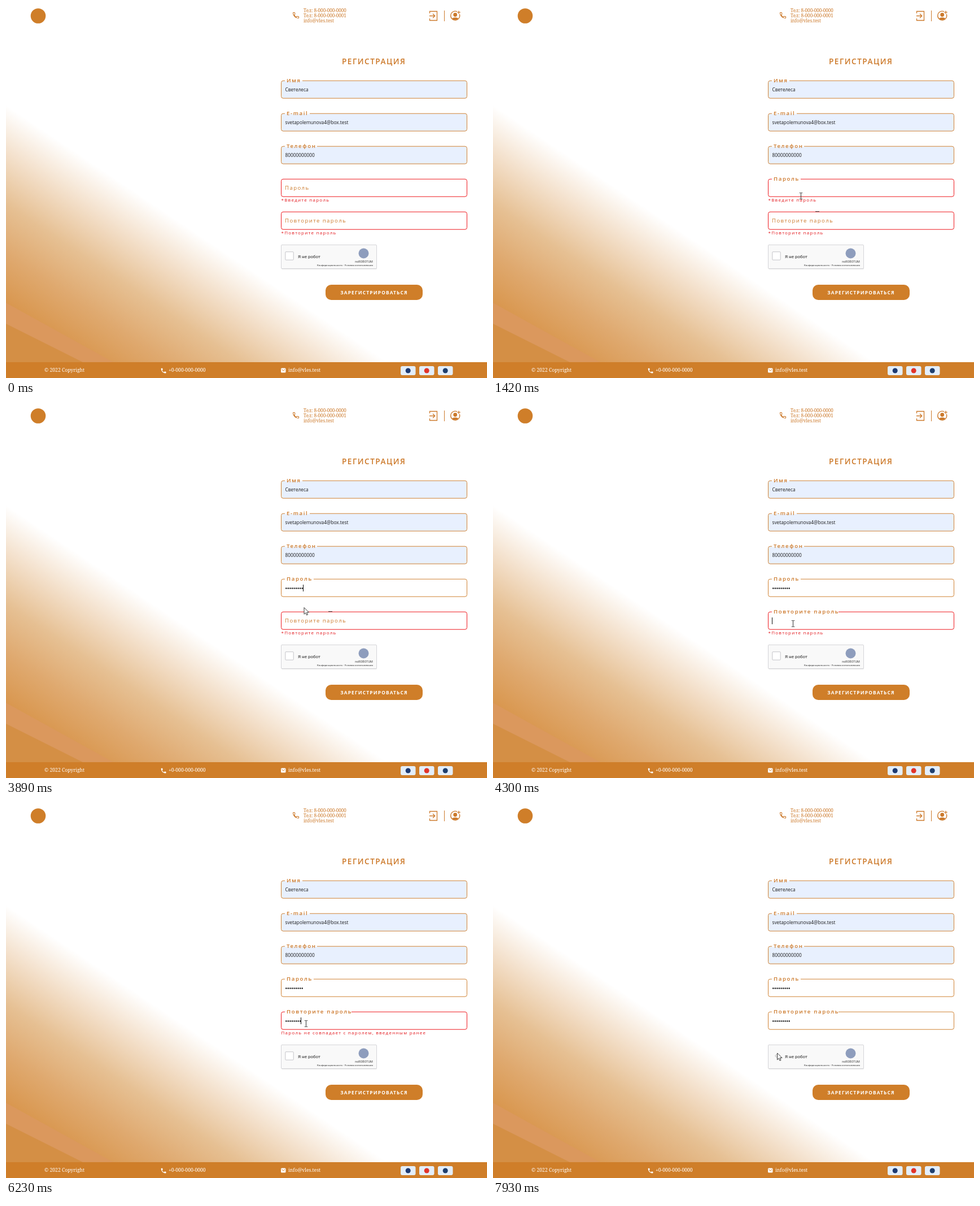
Animation, 852 px wide and 658 px high, one loop 8000 ms. Source, as an HTML page:

```html
<!DOCTYPE html>
<html lang="ru">
<head>
<meta charset="utf-8">
<title>Регистрация</title>
<style>
html, body { margin: 0; width: 100%; height: 100%; overflow: hidden; background: #fff; }
svg { display: block; width: 852px; height: 658px; }
text { font-family: "Open Sans", "Noto Sans", sans-serif; white-space: pre; }
.serif text { font-family: "Noto Serif", "Liberation Serif", serif; }
.small text { font-family: Roboto, "Noto Sans", sans-serif; }
.label { font-size: 9.6px; letter-spacing: 1.4px; fill: #cc7a2c; }
.up { font-weight: 600; letter-spacing: 1.65px; }
.value { font-size: 8.3px; fill: #1c1c1c; }
.error { font-size: 8px; letter-spacing: 1.25px; fill: #e3161c; }
.box { stroke: #d08334; }
.box.bad { stroke: #ee1a1f; }
</style>
</head>
<body>
<svg id="stage" viewBox="0 0 852 658" xmlns="http://www.w3.org/2000/svg">
  <defs>
    <linearGradient id="glow" gradientUnits="userSpaceOnUse" x1="0" y1="525" x2="162" y2="284">
      <stop offset="0" stop-color="#d9974f"/>
      <stop offset=".25" stop-color="#dfa96f"/>
      <stop offset=".5" stop-color="#e6c093"/>
      <stop offset=".75" stop-color="#f3dfc9"/>
      <stop offset="1" stop-color="#fff"/>
    </linearGradient>
    <path id="phone" d="M6.600 10.800c1.400 2.800 3.800 5.100 6.600 6.600l2.200-2.200c.3-.3.7-.4 1-.2 1.100.4 2.300.6 3.600.6.6 0 1 .4 1 1V20c0 .6-.4 1-1 1C10.600 21 3 13.400 3 4c0-.6.4-1 1-1h3.500c.6 0 1 .4 1 1 0 1.300.2 2.500.6 3.600.1.3 0 .7-.2 1z"/>
  </defs>

  <rect width="852" height="658" fill="#fff"/>
  <rect width="852" height="630" fill="url(#glow)"/>
  <path d="M0 525L190 630H0Z" fill="#db985d"/>
  <path d="M0 562L136 630H0Z" fill="#d48f45"/>

  <!-- header -->
  <circle cx="57" cy="17.500" r="13.300" fill="#cf7e29"/>
  <g class="serif" fill="#cc7a2c" font-size="8.100">
    <text x="527" y="10.500">Тел: 8-000-000-0000</text>
    <text x="527" y="19.700">Тел: 8-000-000-0001</text>
    <text x="527" y="28.700">info@vles.test</text>
  </g>
  <g fill="none" stroke="#cc7a2c" stroke-width="1.300">
    <use href="#phone" transform="translate(506.800 9.800) scale(.56)" stroke-width="1.900"/>
    <path d="M750.500 13V9.500H763.500V25.500H750.500V22M750 17.500H759.500M756 13.800L759.700 17.500L756 21.200"/>
    <path d="M776.500 8V27" stroke-width="1"/>
    <path d="M799 9.800A8 8 0 1 0 803.300 14.500"/>
    <path d="M802 8.500V14M799.300 11.200H804.800" stroke-width="1.200"/>
  </g>
  <g fill="#cc7a2c">
    <circle cx="795.700" cy="15.500" r="3.400"/>
    <path d="M790 22.300C792 19.500 799.500 19.500 801.500 22.300C798.500 25.500 793 25.500 790 22.300Z"/>
  </g>

  <text x="595" y="103.300" font-size="13.600" font-weight="600" letter-spacing="1.500" fill="#cc7828">РЕГИСТРАЦИЯ</text>
  <g id="form"></g>

  <!-- robot check -->
  <rect x="488" y="423.500" width="169" height="42.500" rx="1.500" fill="#000" opacity=".08"/>
  <rect x="487.500" y="422.500" width="169" height="42" rx="1.500" fill="#f9f9f9" stroke="#d5d5d8"/>
  <rect id="check" fill="#fff"/>
  <circle cx="633.500" cy="437.500" r="9" fill="#8e9dbd"/>
  <g class="small">
    <text x="517" y="446" font-size="8" fill="#222">Я не робот</text>
    <text x="634" y="454" font-size="5.400" fill="#444" text-anchor="middle">noROBOTUM</text>
    <text x="650" y="460.300" font-size="4.400" fill="#333" text-anchor="end">Конфиденциальность - Условия использования</text>
  </g>

  <rect x="566" y="493" width="172" height="27" rx="10" fill="#cf7e29"/>
  <text x="652" y="510.300" font-size="8.400" font-weight="700" letter-spacing="1.150" fill="#fff" text-anchor="middle">ЗАРЕГИСТРИРОВАТЬСЯ</text>

  <!-- footer -->
  <rect y="630" width="852" height="28" fill="#cf7e29"/>
  <g class="serif" fill="#fff" font-size="8.600">
    <text x="68" y="647">© 2022 Copyright</text>
    <text x="288" y="647">+0-000-000-0000</text>
    <text x="500" y="647">info@vles.test</text>
    <use href="#phone" transform="translate(273.200 639.200) scale(.49)"/>
    <rect x="487" y="640.500" width="8.500" height="8" rx="1.500"/>
  </g>
  <path d="M488.300 642.500L491.200 645.200L494.200 642.500" fill="none" stroke="#cf7e29"/>
  <g fill="#e3eefb">
    <rect x="699" y="637" width="26.500" height="16" rx="3"/>
    <rect x="732" y="637" width="26.500" height="16" rx="3"/>
    <rect x="765" y="637" width="26.500" height="16" rx="3"/>
  </g>
  <circle cx="712.200" cy="645" r="4.500" fill="#1d3a72"/>
  <circle cx="745.200" cy="645" r="4.500" fill="#e2342b"/>
  <circle cx="778.200" cy="645" r="4.500" fill="#1f3f6e"/>

  <path id="dash" d="M571 363.500H578" stroke="#444"/>
  <path id="arrow" d="M0 0V11.800L2.700 9.300L4.500 13.400L6.500 12.500L4.700 8.500H8.500Z" fill="#fff" stroke="#222" stroke-width=".9"/>
  <path id="beam" d="M-2.500-5.500H-.7L0-5L.7-5.500H2.500M0-5V5M-2.500 5.500H-.7L0 5L.7 5.500H2.500" fill="none" stroke="#333"/>
</svg>
<script>
const LOOP = 8000, STEP = 3.55, BLINK = 530;
const TOP = 132.2, PITCH = 58;
const form = document.getElementById('form');
const byId = id => document.getElementById(id);

function add(tag, attrs, text) {
  const el = document.createElementNS('http://www.w3.org/2000/svg', tag);
  set(el, attrs);
  if (text) el.textContent = text;
  form.append(el);
  return el;
}
function set(el, attrs) {
  for (const k in attrs) el.setAttribute(k, attrs[k]);
}
const show = (el, on) => el.setAttribute('visibility', on ? 'visible' : 'hidden');
const clamp = v => Math.max(0, Math.min(1, v));
const ease = v => v * v * (3 - 2 * v);

function box(y, gapEnd, fill) {
  const frame = add('rect', { class: 'box', x: 487.5, y, width: 329, height: 31, rx: 3.5, fill });
  const gap = add('rect', { x: 494, y: y - 1, width: gapEnd - 494, height: 2, fill: '#fff' });
  return { frame, gap };
}

[['Имя', 'Светелеса', 525], ['E-mail', 'svetapolemunova4@box.test', 538], ['Телефон', '80000000000', 551]]
  .forEach(([name, value, gapEnd], i) => {
    const y = TOP + PITCH * i;
    box(y, gapEnd, '#e8f0fe');
    add('text', { class: 'label up', x: 497, y: y + 2.6 }, name);
    add('text', { class: 'value', x: 494.5, y: y + 18.6 }, value);
  });

const SHORT = 'Пароль должен содержать минимум 8 символов';
const DIFFER = 'Пароль не совпадает с паролем, введенным ранее';

function password(opts) {
  const { name, gapEnd, row } = opts;
  const y = TOP + PITCH * row;
  return {
    ...opts, y, ...box(y, gapEnd, '#fff'),
    label: add('text', { class: 'label' }, name),
    error: add('text', { class: 'error', x: 487.5, y: y + 39.6 }),
    dots: opts.keys.map((_, i) => add('circle', { cx: 494.5 + STEP * (i + .5), cy: y + 16.3, r: 1.2, fill: '#111' })),
    caret: add('path', { stroke: '#111' })
  };
}

const fields = [
  password({
    row: 3, name: 'Пароль', gapEnd: 545, empty: '*Введите пароль', lift: [870, 1085],
    focus: 890, blur: 4170, valid: 8, keys: [1620, 1820, 2020, 2280, 2480, 2680, 3010, 3230, 3430]
  }),
  password({
    row: 4, name: 'Повторите пароль', gapEnd: 612, empty: '*Повторите пароль', lift: [4120, 4295],
    focus: 4170, blur: 7700, valid: 9, keys: [4770, 4970, 5100, 5370, 5570, 5770, 6030, 6230, 6430]
  })
];

function drawField(f, t) {
  const n = f.keys.filter(k => t >= k).length;
  const ok = n >= f.valid;
  const p = ease(clamp((t - f.lift[0]) / (f.lift[1] - f.lift[0])));
  set(f.label, { x: 494 + 3 * p, y: f.y + 18.6 - 16 * p, class: p > .5 ? 'label up' : 'label' });
  show(f.gap, p > .7);
  f.frame.setAttribute('class', ok ? 'box' : 'box bad');
  f.error.textContent = ok ? '' : n === 0 ? f.empty : n < 8 ? SHORT : DIFFER;
  f.dots.forEach((d, i) => show(d, i < n));
  const last = n ? f.keys[n - 1] : f.focus;
  const x = Math.floor(494.5 + STEP * n) + .5;
  f.caret.setAttribute('d', `M${x} ${f.y + 9.8}v12`);
  show(f.caret, t >= f.focus && t < f.blur && (t - last) % (2 * BLINK) < BLINK);
}

// pointer stops: time, x, y
const path = [
  [70, 812, 650], [760, 548, 330], [890, 545.5, 336], [3880, 545.5, 336], [3890, 528, 356.5],
  [4100, 531.5, 385], [7010, 531.5, 385], [7430, 512, 447], [7720, 503, 429], [7790, 503.5, 437]
];

function pointerAt(t) {
  const i = path.findIndex(s => s[0] > t);
  if (i < 0) return path[path.length - 1].slice(1);
  const a = path[Math.max(0, i - 1)], b = path[i];
  const u = clamp((t - a[0]) / (b[0] - a[0] || 1));
  const p = i === 1 ? 1 - (1 - u) ** 2 : ease(u);
  return [a[1] + (b[1] - a[1]) * p, a[2] + (b[2] - a[2]) * p];
}

function drawPointer(t) {
  const [x, y] = pointerAt(t);
  const inField = fields.some(f => y > f.y && y < f.y + 31.5);
  const place = { transform: `translate(${x} ${y})` };
  set(byId('arrow'), place);
  set(byId('beam'), place);
  show(byId('arrow'), t >= 70 && !inField);
  show(byId('beam'), t >= 70 && inField);
  show(byId('dash'), t >= 520 && t < 4200);
}

function drawCheck(t) {
  const p = clamp((t - 7730) / 200);
  const half = 7.2 - 5.2 * p;
  set(byId('check'), {
    x: 502 - half, y: 442 - half, width: 2 * half, height: 2 * half,
    rx: 1 + p, stroke: t > 7600 ? '#b5b5b5' : '#c4c4c8'
  });
}

function tick() {
  const t = performance.now() % LOOP;
  fields.forEach(f => drawField(f, t));
  drawPointer(t);
  drawCheck(t);
  requestAnimationFrame(tick);
}
tick();
</script>
</body>
</html>
```
